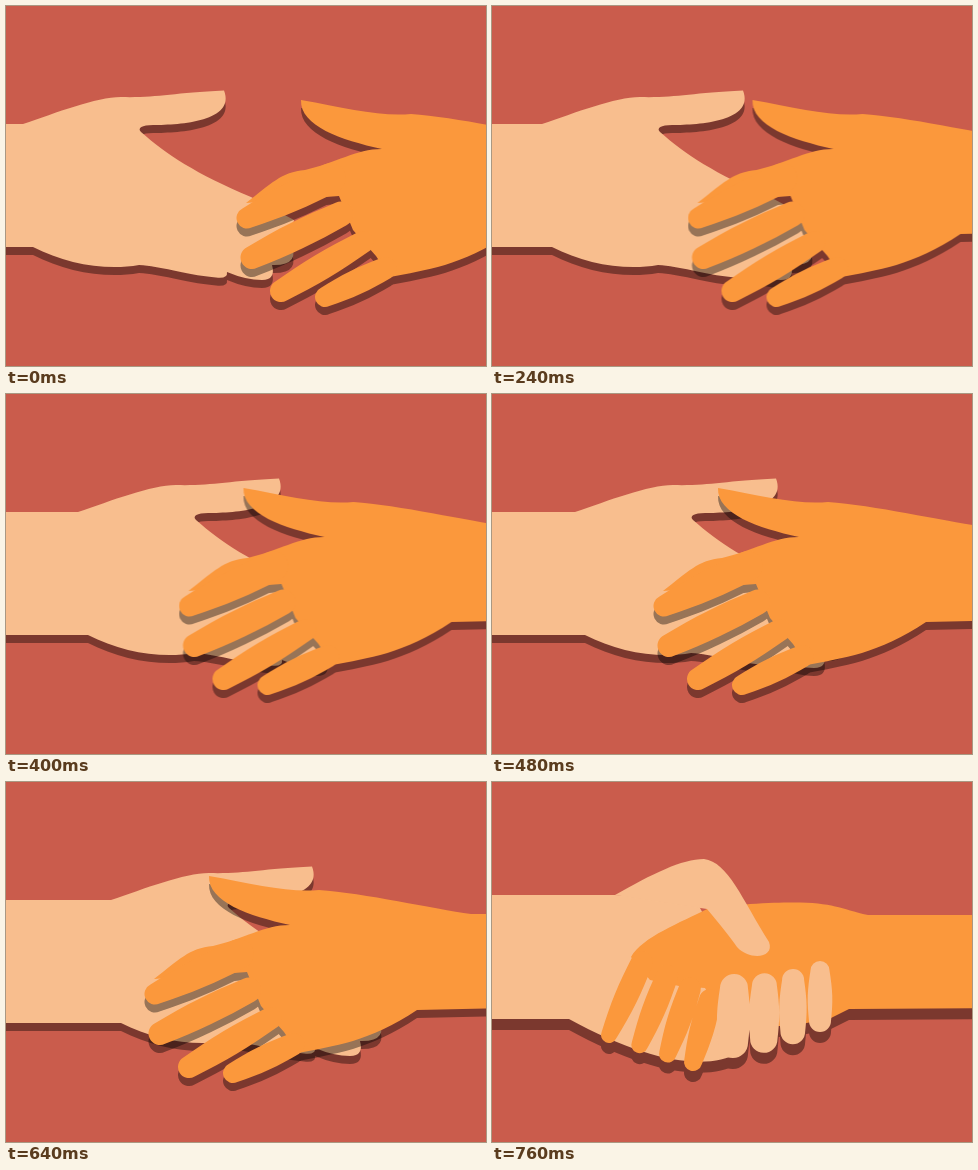
An HTML page that plays this animation: 480x360 px, repeating every 1.88 s.

```html
<!DOCTYPE html>
<html lang="en">
<head>
<meta charset="utf-8">
<title>Handshake</title>
<style>
  html, body { margin: 0; width: 100%; height: 100%; overflow: hidden; background: #ca5c4c; }
  svg { display: block; width: 100%; height: 100%; }
  .peach { fill: #f8be8e; }
  .orange { fill: #fb983c; }
  .shade { fill: #000; opacity: .39; }

  .reach, .shake, .left, .right { animation: 1880ms step-end infinite; }
  .reach { animation-name: reach; }
  .shake { animation-name: shake; }
  .left { animation-name: slide; --end: 104.5px; }
  .right { animation-name: slide; --end: -109.25px; }

  /* 25 pictures per second until the grip at 760 ms */
  @keyframes slide {
    0% { transform: translateX(0); animation-timing-function: steps(19); }
    40.4255%, 100% { transform: translateX(var(--end)); }
  }
  @keyframes reach {
    0% { visibility: visible; }
    40.4255%, 100% { visibility: hidden; }
  }
  @keyframes shake {
    0% { visibility: hidden; }
    40.4255%, 100% { visibility: visible; }
  }
</style>
</head>
<body>
<svg viewBox="0 0 480 360">
  <defs>
    <path id="leftHand" d="M-130 118H17C50 107 90 91 115 91C150 92 165 87 218 84.5
      C230 115 175 119 147 119C136 119 131 122 135 126C160 148 190 168 245 191L288 214
      L284 235Q296 260 266 259Q270 274 256 274Q240 274 221 266Q222 273 210 271.5
      C175 268 155 260 133 259C100 265 60 258 27 241H-130Z"/>
    <g id="rightHand">
      <path d="M640 132H557C520 127 450 111 405 108C375 111 340 102 295 94
        C294 120 335 134 376 143C350 143 330 157 299 164C275 166 265 178 240 197
        L333 190L347 224L370 250L384 271C420 264 455 260 503 228L640 225Z"/>
      <path id="openFingers"/>
    </g>
    <path id="leftPalm" d="M-5 113H123L205 120L246 200V271C215 289 155 280 77 237H-5Z"/>
    <path id="leftThumb" d="M123 113C160 92 190 77 212 77C236 80 250 117 277 160
      C283 176 258 179 245 165Q236 152 215 127Z"/>
    <path id="leftFingers"/>
    <g id="rightGrip">
      <path d="M500 133H376C340 125 340 117 258 122L215 127C190 140 150 155 139 175
        L158 198L187 204L213 206L228 233L245 244H300L339 236L357 227L500 226Z"/>
      <path id="rightFingers"/>
    </g>
  </defs>

  <g class="reach">
    <g class="left">
      <use href="#leftHand" class="shade" y="8"/>
      <use href="#leftHand" class="peach"/>
    </g>
    <g class="right">
      <use href="#rightHand" class="shade" y="8"/>
      <use href="#rightHand" class="orange"/>
    </g>
  </g>

  <g class="shake">
    <g class="shade" transform="translate(0 11)">
      <use href="#leftPalm"/><use href="#rightGrip"/><use href="#leftFingers"/>
    </g>
    <use href="#leftPalm" class="peach"/>
    <use href="#rightGrip" class="orange"/>
    <use href="#leftThumb" class="peach"/>
    <use href="#leftFingers" class="peach"/>
  </g>
</svg>
<script>
  const BULGE = 2, STEPS = 8;
  const lerp = (a, b, t) => a + (b - a) * t;
  const circle = (x, y, r) => ({ x, y, r });

  // A rounded finger that tapers from base to tip and swells a little halfway
  function finger({ tip, base }) {
    const angle = Math.atan2(base.y - tip.y, base.x - tip.x);
    const edge = (t, side) => {
      const r = side * (lerp(tip.r, base.r, t) + BULGE * Math.sin(Math.PI * t));
      return [
        lerp(tip.x, base.x, t) - r * Math.sin(angle),
        lerp(tip.y, base.y, t) + r * Math.cos(angle)
      ];
    };
    const there = [], back = [];
    for (let i = 0; i <= STEPS; i++) {
      there.push(edge(i / STEPS, 1));
      back.push(edge(1 - i / STEPS, -1));
    }
    const cap = (r, end) => `A${r} ${r} 0 0 0 ${end}`;
    return `M${there.join("L")}${cap(base.r, back[0])}L${back.join("L")}${cap(tip.r, there[0])}Z`;
  }

  // Four fingers evenly spread from first to last, the inner ones shifted by (dx, dy)
  function fan(first, last, dx, dy) {
    return [0, 1, 2, 3].map(i => {
      const t = i / 3, bow = 4 * t * (1 - t);
      const between = (a, b) => circle(
        lerp(a.x, b.x, t) + dx * bow, lerp(a.y, b.y, t) + dy * bow, lerp(a.r, b.r, t));
      return { tip: between(first.tip, last.tip), base: between(first.base, last.base) };
    });
  }

  function draw(id, fingers) {
    document.getElementById(id).setAttribute("d", fingers.map(finger).join(""));
  }

  draw("openFingers", [
    { tip: circle(241, 212, 10.5), base: circle(325, 172, 15) },
    { tip: circle(246, 251.5, 11.5), base: circle(335, 208, 12.5) },
    { tip: circle(275, 285, 11), base: circle(357, 236, 11) },
    { tip: circle(319, 291, 10), base: circle(380, 262, 11) }
  ]);
  draw("rightFingers", fan(
    { tip: circle(117, 253, 8), base: circle(150, 180, 11) },
    { tip: circle(201, 280, 9), base: circle(218, 218, 11) }, 3, 1));
  draw("leftFingers", fan(
    { tip: circle(242, 206, 14), base: circle(241, 261, 15) },
    { tip: circle(328, 188.5, 9.5), base: circle(328, 239, 11) }, 2, 4));
</script>
</body>
</html>
```
